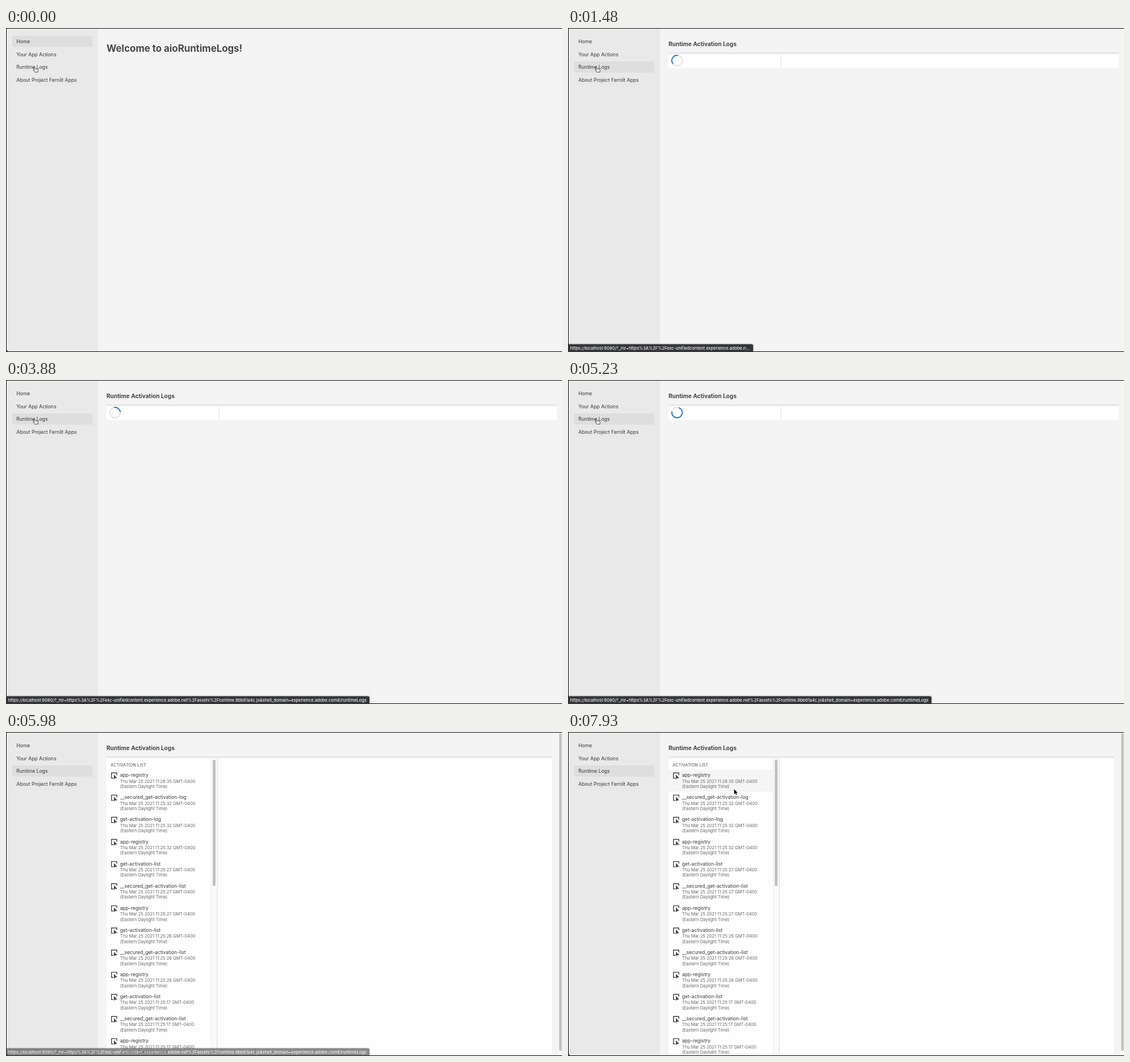
These frames come from a looping animation (979 by 572 pixels, 8000 ms). An HTML page:

```html
<!DOCTYPE html>
<html lang="en">
<head>
<meta charset="utf-8">
<title>Runtime Activation Logs</title>
<style>
html, body { margin: 0; width: 100%; height: 100%; overflow: hidden; background: #f4f4f4; }
svg { display: block; font-family: Inter, "Noto Sans", sans-serif; fill: #383838; }
.nav { font-size: 8.62px; }
.title { font-size: 8.55px; }
.date { font-size: 7.55px; fill: #666; }
.caps { font-size: 6.95px; font-weight: 500; letter-spacing: .29px; fill: #666; }
.h1 { font-size: 16.82px; font-weight: 700; fill: #484848; }
.h2 { font-size: 10.08px; font-weight: 700; fill: #444; }
.url { font-size: 7.36px; font-weight: 500; fill: #f2f2f2; }
.panel { fill: #fefefe; }
.rule { fill: #e0e0e0; }
.thumb { fill: #c1c1c1; }
</style>
</head>
<body>
<svg width="979" height="572" viewBox="0 0 979 572">
  <defs>
    <clipPath id="listClip"><rect x="177" y="47" width="184" height="521"/></clipPath>
    <g id="icon">
      <path d="M10.1 4.6V.7H.7V9.9H4.2" fill="none" stroke="#444" stroke-width="1.4"/>
      <path d="M5 3.6V12L7 10L10.9 9.7Z" fill="#444"/>
    </g>
  </defs>
  <rect width="979" height="572" fill="#f4f4f4"/>
  <rect width="162" height="572" fill="#e9e9e9"/>
  <rect id="selected" x="11" width="141" height="20" rx="2.5" fill="#dedede"/>
  <g id="nav"></g>

  <text id="home" class="h1" x="177" y="42">Welcome to aioRuntimeLogs!</text>

  <g id="logs">
    <text class="h2" x="177" y="32.2">Runtime Activation Logs</text>
    <g id="loading">
      <rect class="rule" x="177" y="43.3" width="793" height="1.5"/>
      <rect x="177" y="47" width="793" height="23.5" fill="#efefef"/>
      <rect class="panel" x="177" y="47" width="197" height="23.5"/>
      <rect class="panel" x="376" y="47" width="594" height="23.5"/>
      <g fill="none" stroke-width="1.9">
        <circle cx="192" cy="57.5" r="9.2" stroke="#e1e1e1"/>
        <path id="arc" stroke="#2079e2"/>
      </g>
    </g>
    <g id="loaded">
      <rect class="rule" x="177" y="43.3" width="784" height="1.5"/>
      <rect x="177" y="47" width="784" height="521" fill="#ebebeb"/>
      <rect class="panel" x="177" y="47" width="184" height="521"/>
      <rect x="362" y="47" width="9" height="521" fill="#fafafa"/>
      <rect class="thumb" x="364" y="49" width="5" height="223" rx="2.5"/>
      <rect class="panel" x="373" y="47" width="588" height="521"/>
      <rect x="973" y="1" width="6" height="570" fill="#fafafa"/>
      <rect class="thumb" x="974" y="2" width="4.5" height="561" rx="2.2"/>
      <rect id="hover" x="177" width="184" height="38.5" fill="#f5f5f5"/>
      <text class="caps" x="184.3" y="60.5">ACTIVATION LIST</text>
      <g id="list" clip-path="url(#listClip)"></g>
    </g>
  </g>

  <path d="M0 566V572H6Q.5 572 .5 566"/>
  <path d="M979 .5H.5V566Q.5 571.5 6 571.5H979" fill="none" stroke="#000"/>

  <g id="bubble">
    <path id="bubbleShadow" fill="#000" opacity=".12"/>
    <path id="bubbleBox" fill="#343537"/>
    <text id="url" class="url" x="3.8" y="567.7"></text>
  </g>

  <path id="hand" transform="translate(46.6 68)" fill="#fff" stroke="#111" stroke-width=".8" stroke-linejoin="round"
    d="M4.2 9.9C3.5 8.6 2 7.4 1.4 6.4C1.2 5.4 2.4 5.2 3.4 6.3L1.7 1.9C1.6 .7 2.9 .4 3.4 1.5L4.6 4.3C5.2 3.6 6.2 3.8 6.5 4.5C7.2 4 8 4.3 8.3 5C9.1 4.8 9.7 5.3 9.8 6.2C10 7.6 9.7 8.6 9.4 9.9Z"/>
  <path id="arrow" d="M0 0V8.8L2 6.9L3.4 10.1L4.9 9.4L3.5 6.4H6.3Z"
    fill="#000" stroke="#fff" stroke-width="1" paint-order="stroke"/>
</svg>
<script>
const $ = id => document.getElementById(id);
const show = (id, on) => $(id).style.display = on ? '' : 'none';
const set = (id, attr, value) => $(id).setAttribute(attr, value);
const text = (cls, x, y, s) => `<text class="${cls}" x="${x}" y="${y}">${s}</text>`;

const LOOP = 8000, ROW = 39.09, LIST_TOP = 66.6;
const OPEN = 450, LOAD = 5380;
const URL_TEXT = 'https://localhost:9080/?_mr=https%3A%2F%2Fexc-unifiedcontent.experience.adobe.net%2Fassets%2Fruntime.8bb61a4c.js&shell_domain=experience.adobe.com#/runtimeLogs';
const URL_SHORT = URL_TEXT.slice(0, URL_TEXT.indexOf('.net') + 2) + '...';

$('nav').innerHTML = ['Home', 'Your App Actions', 'Runtime Logs', 'About Project Fernlit Apps']
  .map((s, i) => text('nav', 18.2, 27.1 + i * 22.67, s)).join('');

const cycle = ['app-registry', 'get-activation-list', '__secured_get-activation-list'];
const times = ['25:32', '25:27', '25:26', '25:17'];
$('list').innerHTML = Array.from({ length: 13 }, (_, i) => {
  const name = i == 1 ? '__secured_get-activation-log' : i == 2 ? 'get-activation-log' : cycle[i % 3];
  const time = i ? times[Math.floor((i - 1) / 3)] : '28:35';
  return `<g transform="translate(0 ${i * ROW})"><use href="#icon" x="185" y="71.6"/>` +
    text('title', 200.8, 79.3, name) +
    text('date', 200.8, 89.5, `Thu Mar 25 2021 11:${time} GMT-0400`) +
    text('date', 200.8, 99, '(Eastern Daylight Time)') + '</g>';
}).join('');

// Linear track through points [time, value, value]
function track(points, t) {
  if (t <= points[0][0]) return points[0].slice(1);
  const i = points.findIndex(p => p[0] > t);
  if (i < 0) return points[points.length - 1].slice(1);
  const a = points[i - 1], b = points[i], k = (t - a[0]) / (b[0] - a[0]);
  return [1, 2].map(n => a[n] + (b[n] - a[n]) * k);
}

// Tail and head of the spinner arc, in degrees clockwise from the top
const spin = [[880, -10, 85], [1230, 20, 280], [1380, 150, 345], [1480, 230, 370], [1880, 350, 445]];
const pointer = [[6430, 331, 156], [6880, 318.5, 165], [7480, 318.5, 165], [7930, 292.5, 101]];

function drawSpinner(t) {
  const phase = t % 1000;
  const [tail, head] = track(spin, phase < 880 ? phase + 1000 : phase);
  const at = deg => {
    const a = deg * Math.PI / 180;
    return `${192 + 9.2 * Math.sin(a)} ${57.5 - 9.2 * Math.cos(a)}`;
  };
  set('arc', 'd', `M${at(tail)}A9.2 9.2 0 ${head - tail > 180 ? 1 : 0} 1 ${at(head)}`);
}

function drawBubble(t) {
  const alpha = Math.min(1, t / 300, Math.max(0, (6180 - t) / 350));
  const w = t < 1780 ? 326 : t < 1930 ? 483 : 640;
  const box = (r, top) => `M0 ${top}H${r - 3}Q${r} ${top} ${r} ${top + 3}V572H0Z`;
  set('bubble', 'opacity', alpha);
  set('bubbleShadow', 'd', box(w + 1.5, 556.8));
  set('bubbleBox', 'd', box(w, 558.3));
  $('url').textContent = t < 1930 ? URL_SHORT : URL_TEXT;
}

function draw(t) {
  const open = t >= OPEN, loaded = t >= LOAD;
  show('home', !open);
  show('logs', open);
  show('loading', !loaded);
  show('loaded', loaded);
  set('selected', 'y', open ? 59 : 13.6);
  drawSpinner(t);
  drawBubble(t);

  const [x, y] = track(pointer, t), pointing = t >= 6430;
  show('hand', t < 5530);
  show('arrow', pointing);
  show('hover', pointing);
  set('arrow', 'transform', `translate(${x} ${y})`);
  set('hover', 'y', LIST_TOP + ROW * Math.floor((y - LIST_TOP) / ROW));
}

const step = t => t < 1180 ? t - t % 150 : t - (t - 1180) % 150;

const start = performance.now();
function tick() {
  draw(step((performance.now() - start) % LOOP));
  requestAnimationFrame(tick);
}
tick();
</script>
</body>
</html>
```
